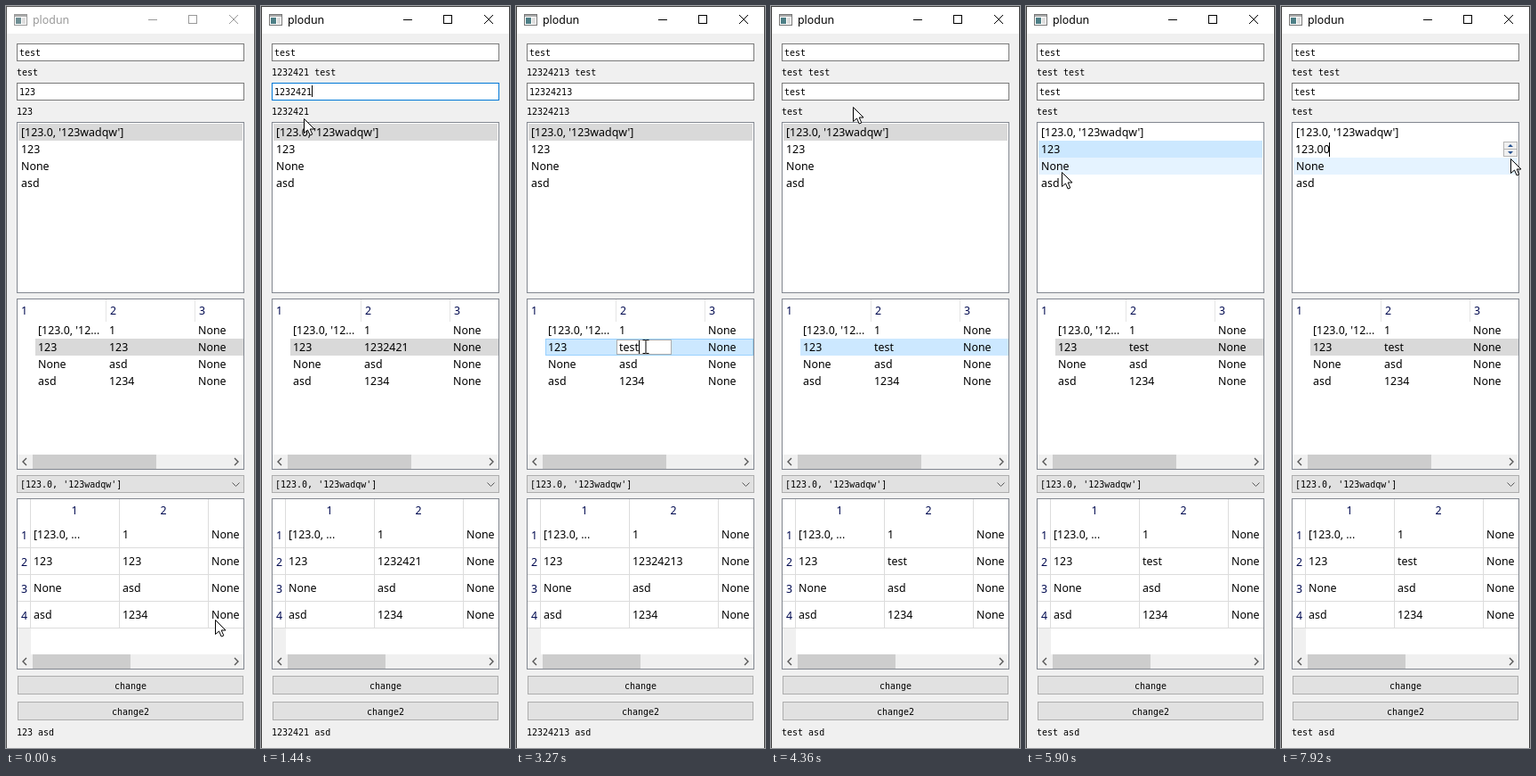
An HTML page that plays this animation: 280 px wide and 832 px high, repeating every 7990 ms.

```html
<!DOCTYPE html>
<html lang="en">
<head>
<meta charset="utf-8">
<title>Linked widgets</title>
<style>
  html, body { margin: 0; width: 100%; height: 100%; overflow: hidden; background: #f0f0f0; }
  svg { display: block; width: 280px; height: 832px; }
  rect, line { shape-rendering: crispEdges; }
  text { font: 12.4px "Noto Sans", "Open Sans", sans-serif; white-space: pre; }
  .mono { font: 10px "DejaVu Sans Mono", "Liberation Mono", monospace; }
</style>
</head>
<body>
<svg id="stage" viewBox="0 0 280 832"></svg>
<script>
const LOOP = 7990;
const FOCUS_EDIT = 680, FOCUS_TREE = 2280, FOCUS_LIST = 5270;
const OPEN_CELL = 2460, COMMIT = 3640, OPEN_SPIN = 6790;
const HOVER = '#e5f3ff', BLUE = '#cce8ff', GREY = '#d9d9d9', ACCENT = '#0078d7', NAVY = '#000a50';
const LIST = ["[123.0, '123wadqw']", '123', 'None', 'asd'];

// [start, end, steps, x, y]
const MOVES = [
  [60, 680, 10, 60, 96], [930, 1000, 2, 48, 126], [1760, 2280, 8, 188, 380],
  [2890, 3020, 2, 146, 382], [4050, 4360, 6, 92, 113], [4430, 4430, 1, 95, 66],
  [4570, 4700, 3, 80, 44], [4760, 5020, 5, 40, 165], [5520, 5620, 3, 44, 205],
  [5690, 5900, 3, 40, 186], [5960, 6290, 5, 40, 176], [6340, 6340, 1, 40, 174],
  [6540, 6590, 2, 44, 162], [6980, 6980, 1, 49, 162], [7230, 7350, 3, 72, 162],
  [7550, 7600, 2, 225, 178], [7850, 7920, 2, 258, 171]
];
const VALUE = [[0, '123'], [1000, '1232'], [1120, '12324'], [1250, '123242'],
  [1380, '1232421'], [1690, '12324213'], [COMMIT, 'test']];
const CELL = [[OPEN_CELL, '12324213'], [2890, 't'], [3020, 'te'], [3200, 'tes'], [3270, 'test']];

const at = (track, t) => track.reduce((now, [start, v]) => t >= start ? v : now, track[0][1]);
const inside = (p, x, y, w, h) => p.x >= x && p.x < x + w && p.y >= y && p.y < y + h;

const fill = (x, y, w, h, color) => `<rect x="${x}" y="${y}" width="${w}" height="${h}" fill="${color}"/>`;
const box = (x, y, w, h, border, color = '#fff') =>
  fill(x, y, w, h, border) + fill(x + 1, y + 1, w - 2, h - 2, color);
const text = (x, y, s, color = '#000', extra = '') =>
  `<text x="${x}" y="${y}" fill="${color}" ${extra}>${s}</text>`;
const mono = (x, y, s, extra = '') => text(x, y, s, '#000', `class="mono" ${extra}`);
const path = (d, stroke, color = 'none', width = 1) =>
  `<path d="${d}" stroke="${stroke}" fill="${color}" stroke-width="${width}"/>`;

function pointer(t) {
  let x = 235, y = 688;
  for (const [start, end, steps, tx, ty] of MOVES) {
    if (t < start) break;
    const step = t >= end ? steps : 1 + Math.floor((t - start) / (end - start) * (steps - 1));
    x += (tx - x) * step / steps;
    y += (ty - y) * step / steps;
  }
  return { x: Math.round(x), y: Math.round(y) };
}

function titleBar(active) {
  const ink = active ? '#000' : '#999';
  return fill(0, 0, 280, 31, '#fff') +
    box(9, 9, 15, 13, active ? '#777' : '#999') + fill(10, 10, 13, 2, '#aaa') +
    fill(11, 13, 6, 7, active ? '#4d7f86' : '#6f8f94') + fill(18, 13, 4, 7, '#ddd') +
    text(30, 20, 'plodun', ink) +
    fill(160, 15, 10, 1, ink) + box(205, 10, 10, 10, ink) +
    path('M251 10l10 10M261 10l-10 10', ink);
}

function lineEdit(y, value, focused, mouse) {
  const hovered = inside(mouse, 12, y, 256, 20);
  return box(12, y, 256, 20, focused ? ACCENT : hovered ? '#171717' : '#7a7a7a') + mono(15, y + 14, value);
}

const scrollBar = (y, width) =>
  fill(13, y, 254, 16, '#f0f0f0') + fill(30, y, width, 16, '#cdcdcd') +
  path(`M23 ${y + 4}l-4 4 4 4M257 ${y + 4}l4 4-4 4`, '#555', 'none', 1.4);

const button = (y, label) =>
  box(13, y, 254, 21, '#adadad', '#e1e1e1') + mono(140, y + 15, label, 'text-anchor="middle"');

function listView(t, mouse) {
  const selected = t < FOCUS_LIST ? 0 : 1, editing = t >= OPEN_SPIN;
  let out = box(12, 130, 256, 192, '#828790');
  LIST.forEach((label, i) => {
    const y = 132 + 19 * i;
    if (editing && i === 1) return;
    if (i === selected) out += fill(14, y, 252, 19, t < FOCUS_LIST ? GREY : BLUE);
    else if (inside(mouse, 14, y, 252, 19)) out += fill(14, y, 252, 19, HOVER);
    out += text(17, y + 14, label);
  });
  return editing ? out + spinBox(t) : out;
}

function spinBox(t) {
  const marked = t < 6980;
  return (marked ? fill(16, 153, 39, 16, ACCENT) : '') +
    text(16, 165, '123.00', marked ? '#fff' : '#000') +
    (t >= 7230 ? fill(54, 153, 1, 16, '#000') : '') +
    box(250, 152, 16, 9, '#b5b5b5', '#f0f0f0') + box(250, 160, 16, 9, '#b5b5b5', '#f0f0f0') +
    path('M255 158l3-3 3 3zM255 163l3 3 3-3z', 'none', '#24508f');
}

function treeView(t, mouse, value) {
  const rows = [["[123.0, '12...", '1'], ['123', value], ['None', 'asd'], ['asd', '1234']];
  const focused = t >= FOCUS_TREE && t < FOCUS_LIST;
  const editing = t >= OPEN_CELL && t < COMMIT;
  let out = box(12, 328, 256, 192, '#828790');
  for (let i = 0; i < 3; i++) {
    out += text(17 + 100 * i, 346, i + 1, NAVY);
    if (i) out += fill(12 + 100 * i, 329, 1, 25, '#e5e5e5');
  }
  rows.forEach((row, i) => {
    const y = 354 + 19 * i, hovered = inside(mouse, 14, y, 253, 19);
    if (i === 1) {
      const color = focused ? BLUE : GREY;
      out += box(33, y, 234, 19, focused && hovered ? '#99d1ff' : color, color);
    } else if (hovered) out += fill(33, y, 234, 19, HOVER);
    [...row, 'None'].forEach((s, col) => {
      if (!(editing && i === 1 && col === 1)) out += text([36, 116, 216][col], y + 14, s);
    });
  });
  return out + (editing ? cellEditor(t) : '') + scrollBar(503, 139);
}

function cellEditor(t) {
  const typed = at(CELL, t), marked = t < CELL[1][0];
  const caret = 116 + [0, 5, 12, 17, 22][typed.length];
  return box(113, 374, 62, 17, '#adadad') +
    (marked ? fill(116, 375, 57, 15, ACCENT) : '') +
    text(116, 387, typed, marked ? '#fff' : '#000') +
    (marked ? '' : fill(caret, 375, 1, 15, '#000'));
}

function tableView(value) {
  const rows = [['[123.0, ...', '1'], ['123', value], ['None', 'asd'], ['asd', '1234']];
  let out = box(12, 552, 256, 192, '#828790') + fill(13, 698, 15, 29, '#f0f0f0');
  for (const x of [27, 127, 227]) out += fill(x, 553, 1, 145, '#dcdcdc');
  for (const n of [1, 2]) out += text(100 * n - 23, 570, n, NAVY, 'text-anchor="middle"');
  rows.forEach((row, i) => {
    const y = 597 + 30 * i;
    out += fill(13, y + 10, 254, 1, '#dcdcdc') + text(20.5, y + 1, i + 1, NAVY, 'text-anchor="middle"');
    [...row, 'None'].forEach((s, col) => out += text(31 + 100 * col, y, s));
  });
  return out + scrollBar(727, 110);
}

function cursor(t, { x, y }) {
  const overEdit = inside({ x, y }, 12, 42, 256, 20) || inside({ x, y }, 12, 86, 256, 20);
  const overCell = t >= OPEN_CELL && t < COMMIT && inside({ x, y }, 113, 374, 62, 17);
  const overSpin = t >= 6980 && inside({ x, y }, 14, 151, 236, 19);
  if (overEdit || overCell || overSpin)
    return path(`M${x - 3.5} ${y - 7.5}h3l.5.5.5-.5h3M${x} ${y - 7}v14M${x - 3.5} ${y + 7.5}h3l.5-.5.5.5h3`, '#000');
  return `<g transform="translate(${x + .5} ${y + .5})">` +
    path('M0 0V16L4 12.5L6.7 18.5L9.3 17.4L6.7 11.5H11.5Z', '#000', '#fff') + '</g>';
}

function scene(t) {
  const mouse = pointer(t), value = at(VALUE, t), active = t >= FOCUS_EDIT;
  const typing = active && t < FOCUS_TREE;
  const border = active ? '#3c3c3c' : '#555';
  return fill(0, 0, 280, 832, '#f0f0f0') + titleBar(active) +
    fill(0, 0, 280, 1, border) + fill(0, 0, 1, 832, border) + fill(279, 0, 1, 832, border) +
    lineEdit(42, 'test', false, mouse) +
    mono(12, 78, t < VALUE[1][0] ? 'test' : value + ' test') +
    lineEdit(86, value, typing, mouse) +
    (typing ? fill(15 + 6 * value.length, 89, 1, 13, '#000') : '') +
    mono(12, 122, value) +
    listView(t, mouse) + treeView(t, mouse, value) +
    box(12, 526, 256, 20, '#adadad', '#e1e1e1') + mono(16, 540, LIST[0]) +
    path('M254.5 534.5l4 4 4-4', '#555') +
    tableView(value) + button(751, 'change') + button(780, 'change2') +
    mono(12, 818, value + ' asd') + cursor(t, mouse);
}

const stage = document.getElementById('stage');
const begin = performance.now();
let shown = '';
function draw() {
  const next = scene((performance.now() - begin) % LOOP);
  if (next !== shown) stage.innerHTML = shown = next;
  requestAnimationFrame(draw);
}
draw();
</script>
</body>
</html>
```
